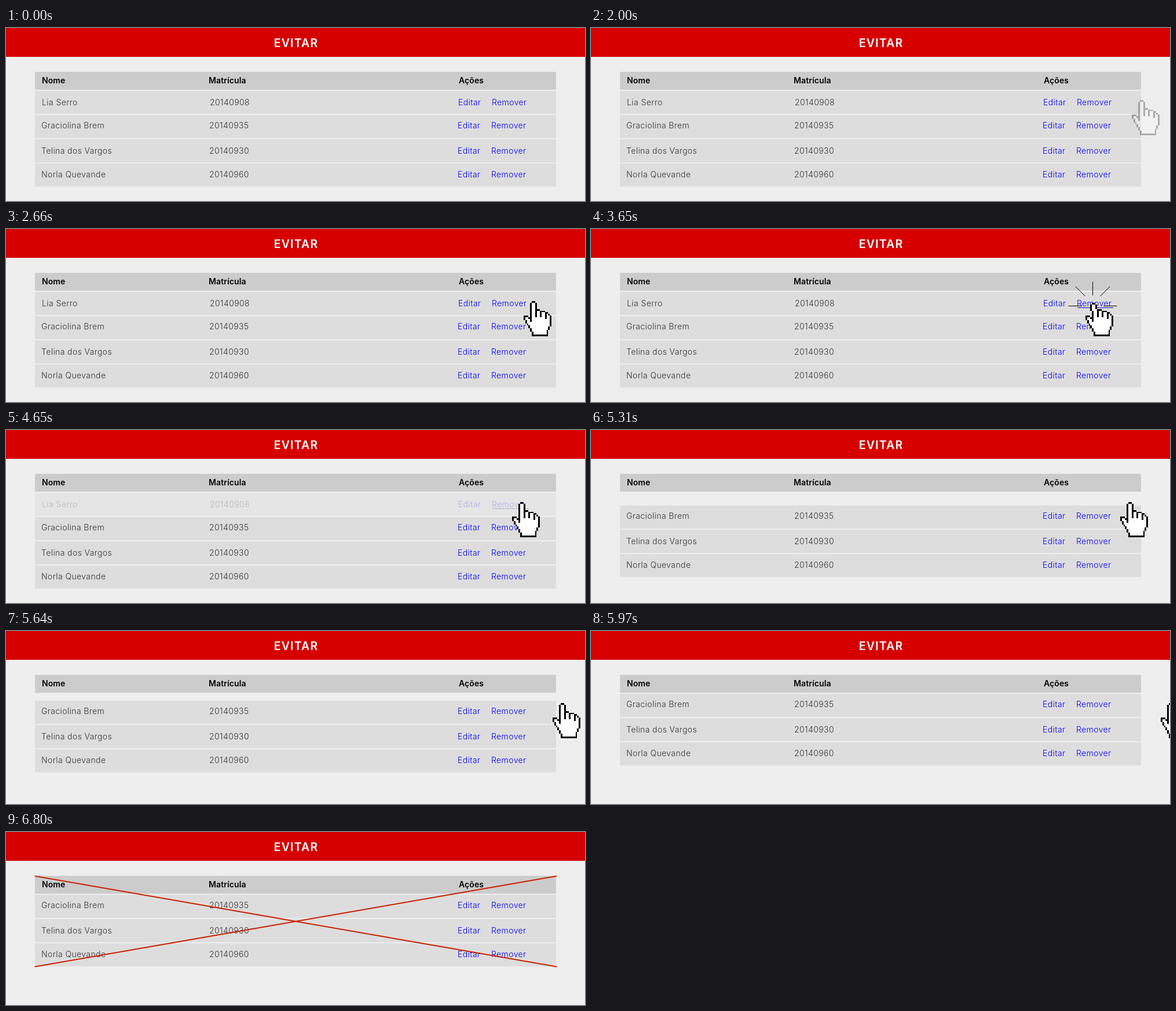
These frames come from a looping animation (1000 px wide and 300 px high, 9800 ms). An HTML page with a canvas:

```html
<!DOCTYPE html>
<html lang="pt">
<head>
<meta charset="utf-8">
<title>Evitar</title>
<style>
html, body { margin: 0; width: 100%; height: 100%; overflow: hidden; background: #eee; }
canvas { display: block; }
</style>
</head>
<body>
<canvas id="stage" width="1000" height="300"></canvas>
<script>
const ctx = document.getElementById('stage').getContext('2d');
const BLUE = '#0000f5';
const INK = '#333';
const ROW = 42;

// Timeline in ms: the cursor comes in, clicks, the row fades, the list closes up.
const LOOP = 9800, BEAT = 330;
const ENTER = 2000, PRESS = 3650, FADE = 4150, LEAVE = 4650, GONE = 6300, CROSS = 6800;

// drop: distance from the top of the row to its baseline
const students = [
  { name: 'Lia Serro', id: '20140908', drop: 25 },
  { name: 'Graciolina Brem', id: '20140935', drop: 23 },
  { name: 'Telina dos Vargos', id: '20140930', drop: 25 },
  { name: 'Norla Quevande', id: '20140960', drop: 24 }
];

function stateAt(time) {
  if (time < ENTER) return {};
  if (time < LEAVE) {
    const beat = Math.min(Math.floor((time - ENTER) / BEAT), 4);
    const faded = time >= FADE;
    return {
      x: 934 - 20 * beat,
      alpha: Math.min(0.27 + beat * 0.365, 1),
      hover: beat >= 3,
      press: time >= PRESS && !faded,
      text: faded ? 0.6 : 1,
      back: faded ? 0.75 : 1
    };
  }
  const beat = Math.floor((time - LEAVE) / BEAT);
  const speedUp = 5 * Math.max(0, beat - 2) * (beat - 1);
  return {
    x: time < GONE ? 874 + 20 * beat + speedUp : null,
    shift: beat < 4 ? 10 * beat : ROW,
    hover: true, text: 0.25, back: 0.5,
    cross: time >= CROSS
  };
}

// The hand is plotted on a 17 x 22 grid of coarse pixels.
const palm = [
  [7, 5], [9, 5], [10, 6], [12, 6], [13, 7], [14, 7], [16, 9], [16, 14],
  [14, 18], [14, 21], [5, 21], [5, 19], [0, 11], [0, 9], [2, 9], [4, 11]
];
const straightFinger = [[4, 1], [5, 0], [6, 0], [7, 1]];
const bentFinger = [[4, 6], [3, 5], [3, 2], [4, 1], [5, 1], [6, 2], [6, 4]];

function makeHand(finger) {
  const hand = document.createElement('canvas');
  hand.width = 48;
  hand.height = 61;
  const g = hand.getContext('2d');
  const px = c => Math.round(c * 48 / 17);
  const py = r => Math.round(r * 61 / 22);
  const trace = ([c1, r1], [c2, r2]) => {
    const count = Math.max(Math.abs(c2 - c1), Math.abs(r2 - r1));
    for (let i = 0; i <= count; i++) {
      const c = Math.round(c1 + (c2 - c1) * i / count);
      const r = Math.round(r1 + (r2 - r1) * i / count);
      g.fillRect(px(c), py(r), px(c + 1) - px(c), py(r + 1) - py(r));
    }
  };
  const outline = [...palm, ...finger];
  g.fillStyle = '#fff';
  g.beginPath();
  for (const [c, r] of outline) g.lineTo(px(c + 0.5), py(r + 0.5));
  g.fill();
  g.fillStyle = '#000';
  outline.forEach((p, i) => trace(p, outline[(i + 1) % outline.length]));
  for (const k of [0, 1, 2]) trace([7 + 3 * k, 5 + k], [7 + 3 * k, 9 + k / 2]);
  trace([4, 11], [4, 12]);
  return hand;
}

const hand = makeHand(straightFinger);
const pressedHand = makeHand(bentFinger);

function box(x, y, w, h, color) {
  ctx.fillStyle = color;
  ctx.fillRect(x, y, w, h);
}

function label(text, x, y, color, { weight = 350, size = 14, spacing = 0.4 } = {}) {
  ctx.font = `${weight} ${size}px Inter, sans-serif`;
  ctx.letterSpacing = spacing + 'px';
  ctx.fillStyle = color;
  ctx.fillText(text, x, y);
}

function line(x1, y1, x2, y2, color, width) {
  ctx.strokeStyle = color;
  ctx.lineWidth = width;
  ctx.beginPath();
  ctx.moveTo(x1, y1);
  ctx.lineTo(x2, y2);
  ctx.stroke();
}

function drawHeader() {
  box(0, 0, 1000, 300, '#eee');
  box(0, 0, 1000, 50, '#d60000');
  ctx.textAlign = 'center';
  label('EVITAR', 501, 33, '#fff', { weight: 600, size: 19.5, spacing: 1.2 });
  ctx.textAlign = 'left';
  box(50, 76, 900, 31, '#ccc');
  const bold = { weight: 600, spacing: 0.1 };
  label('Nome', 62, 96, '#000', bold);
  label('Matrícula', 350, 96, '#000', bold);
  label('Ações', 782, 96, '#000', bold);
}

function drawRow(index, { shift = 0, text = 1, back = 1, hover = false }) {
  const { name, id, drop } = students[index];
  const top = 109 + ROW * index - shift;
  const left = index ? 61 : 62;
  ctx.globalAlpha = back;
  box(50, top, 900, 40, '#ddd');
  ctx.globalAlpha = text;
  label(name, left, top + drop, INK);
  label(id, left + 290, top + drop, INK);
  label('Editar', left + 719, top + drop, BLUE);
  label('Remover', left + 777, top + drop, BLUE);
  if (hover) box(840, 136, 62, 1, BLUE);
  ctx.globalAlpha = 1;
}

function drawClick() {
  for (let i = 0; i <= 4; i++) {
    const angle = i * Math.PI / 4;
    const lift = 4 * Math.abs(Math.sin(2 * angle));
    const at = r => [866.5 + r * Math.cos(angle), 133.5 - r * Math.sin(angle) - lift];
    line(...at(18.5), ...at(42), '#000', 1);
  }
}

function drawCursor({ x, alpha = 1, press }) {
  ctx.globalAlpha = alpha;
  ctx.drawImage(press ? pressedHand : hand, x, 125);
  ctx.globalAlpha = 1;
}

function drawCross() {
  ctx.lineCap = 'round';
  line(50.5, 76.5, 950.5, 233.5, '#cc2200', 2.2);
  line(50.5, 233.5, 950.5, 76.5, '#cc2200', 2.2);
  ctx.lineCap = 'butt';
}

function render(time) {
  const state = stateAt(time);
  drawHeader();
  if (!state.shift) drawRow(0, state);
  for (let i = 1; i < students.length; i++) drawRow(i, { shift: state.shift });
  if (state.press) drawClick();
  if (state.x) drawCursor(state);
  if (state.cross) drawCross();
}

const start = performance.now();
function tick() {
  render((performance.now() - start) % LOOP);
  requestAnimationFrame(tick);
}
tick();
</script>
</body>
</html>
```
